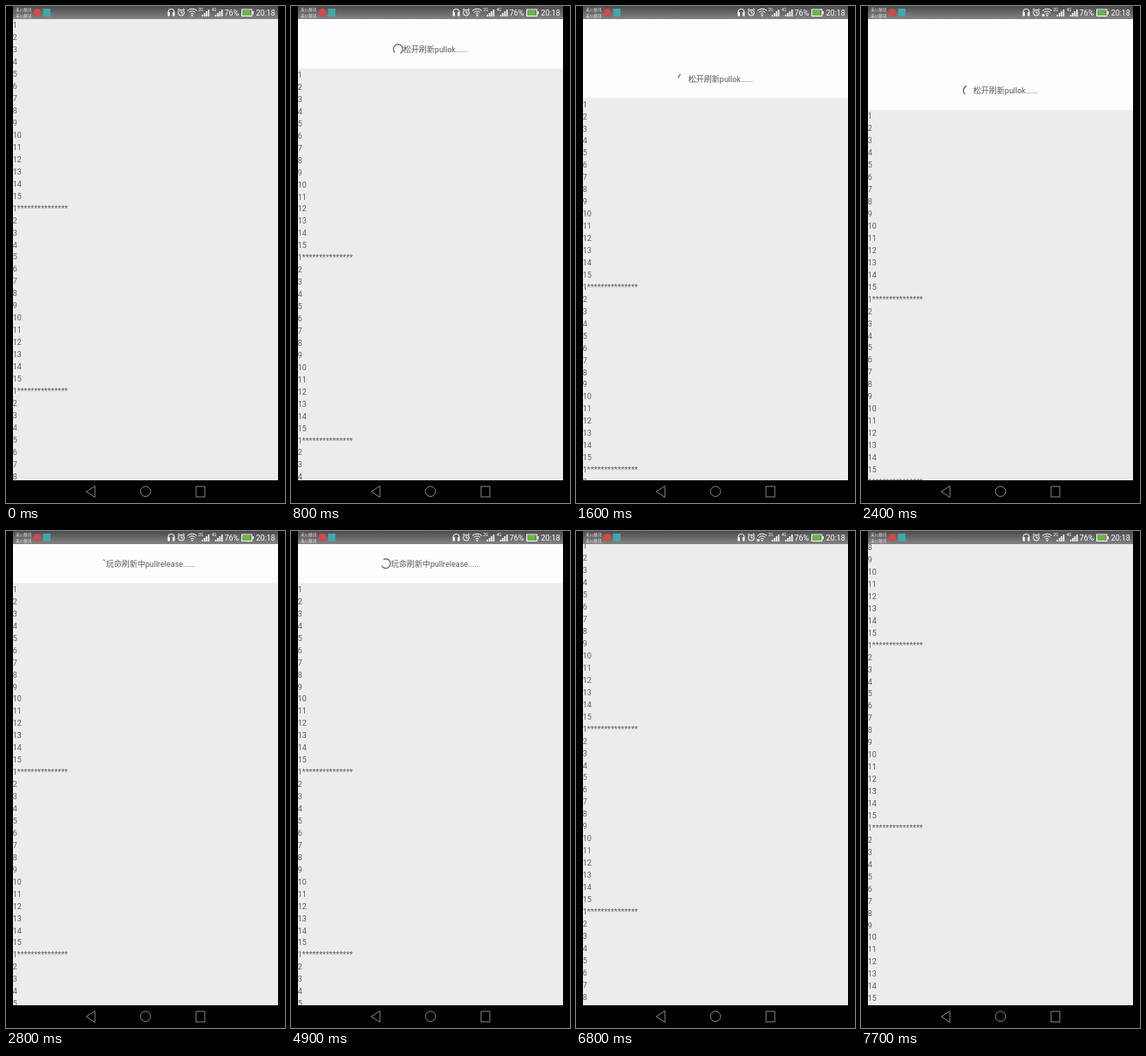
An HTML page with a canvas that plays this animation: 320 by 569 pixels, repeating every 8 s.

```html
<!DOCTYPE html>
<html lang="zh">
<head>
<meta charset="utf-8">
<title>Pull to refresh</title>
<style>
html, body { margin: 0; height: 100%; overflow: hidden; background: #000; }
canvas { display: block; width: 320px; height: 569px; }
</style>
</head>
<body>
<canvas id="stage" width="320" height="569"></canvas>
<script>
const ctx = document.getElementById('stage').getContext('2d');
const LOOP = 8000, STEP = 100;
const LEFT = 8, RIGHT = 312, TOP = 15, BOTTOM = 543;
const ROW = 13.95, HEADER = 44.5, GROUP = 15;

// [time, y of the first row's top edge]
const listTop = [
  [0, 15], [100, 15], [300, 28], [700, 66], [1200, 94], [1700, 108],
  [2400, 119], [2500, 119], [2800, 59.5], [5200, 59.5], [5500, 15],
  [6700, 15], [6800, 10], [6900, 10], [7000, -22], [7100, -52],
  [7200, -74], [7300, -86], [8000, -86]
];

function valueAt(keys, t) {
  const i = Math.max(1, keys.findIndex(k => k[0] >= t));
  const [t0, a] = keys[i - 1], [t1, b] = keys[i];
  return a + (b - a) * (t - t0) / (t1 - t0);
}

// cubic-bezier(.4, 0, .2, 1)
function fastOutSlowIn(x) {
  if (x <= 0) return 0;
  if (x >= 1) return 1;
  let lo = 0, hi = 1;
  for (let i = 0; i < 16; i++) {
    const s = (lo + hi) / 2, r = 1 - s;
    if (3 * r * r * s * .4 + 3 * r * s * s * .2 + s ** 3 < x) lo = s;
    else hi = s;
  }
  return 3 * lo * lo - 2 * lo ** 3;
}

function text(str, x, baseline, size, color) {
  ctx.font = `${size}px Roboto, "Noto Sans CJK SC", "Noto Sans CJK", sans-serif`;
  ctx.fillStyle = color;
  ctx.fillText(str, x, baseline);
}

function rect(x, y, w, h, color) {
  ctx.fillStyle = color;
  ctx.fillRect(x, y, w, h);
}

function arc(x, y, r, from = 0, to = 360) {
  ctx.beginPath();
  ctx.arc(x, y, r, from * Math.PI / 180, to * Math.PI / 180);
  ctx.stroke();
}

function line(...points) {
  ctx.beginPath();
  for (let i = 0; i < points.length; i += 2) ctx.lineTo(points[i], points[i + 1]);
  ctx.stroke();
}

// Indeterminate ring: the head runs ahead, then the tail catches up.
function spinner(x, y, t) {
  const cycle = (t - 2800) / 1333, n = Math.floor(cycle), u = cycle - n;
  const turn = -55 + 504 * n + 234 * u;
  const tail = 270 * fastOutSlowIn(2 * u - 1);
  const head = 270 * fastOutSlowIn(2 * u) + 18;
  ctx.strokeStyle = '#5c5b5d';
  ctx.lineWidth = 1.2;
  arc(x, y, 5.4, turn + tail, turn + head);
}

function header(top, t) {
  rect(LEFT, TOP, RIGHT - LEFT, top - TOP, '#fdfcfe');
  const label = t < 2700 ? '松开刷新pullok......' : '玩命刷新中pullrelease......';
  const y = top - HEADER / 2;
  ctx.font = '9px Roboto, "Noto Sans CJK SC", "Noto Sans CJK", sans-serif';
  const x = 160 - (12 + ctx.measureText(label).width) / 2;
  spinner(x + 6, y, t);
  text(label, x + 12, y + 3.7, 9, '#59585a');
}

function list(top, t) {
  ctx.save();
  ctx.beginPath();
  ctx.rect(LEFT, TOP, RIGHT - LEFT, BOTTOM - TOP);
  ctx.clip();
  rect(LEFT, TOP, RIGHT - LEFT, BOTTOM - TOP, '#ecebee');
  if (top > TOP) header(top, t);
  for (let i = 0; i < 48; i++) {
    const stars = i && i % GROUP === 0 ? '*'.repeat(15) : '';
    text(i % GROUP + 1 + stars, LEFT - .3, top + i * ROW + 10.4, 9, '#5e5d60');
  }
  ctx.restore();
}

function signal(x, label) {
  text(label, x - 4, 5.5, 4.5, '#fff');
  for (let i = 0; i < 4; i++) rect(x + i * 2.4, 10 - i * 2, 1.5, 2 + i * 2, '#fff');
}

function statusBar(t) {
  const shade = ctx.createLinearGradient(0, 0, 0, TOP);
  shade.addColorStop(0, '#4c4a4c');
  shade.addColorStop(1, '#858385');
  rect(LEFT, 0, RIGHT - LEFT, TOP, shade);

  text('禾川移讯', 11, 6, 4.6, '#e8e8e8');
  text('禾川移讯', 11, 13.2, 4.6, '#e8e8e8');
  ctx.fillStyle = '#cf4a48';
  ctx.beginPath();
  ctx.arc(36, 7.5, 4.5, 0, 7);
  ctx.fill();
  rect(42.5, 3, 8.5, 9, '#3fa9ad');

  ctx.strokeStyle = '#fff';
  ctx.lineWidth = 1;
  // headphones
  arc(189.5, 7, 3.6, 180, 360);
  rect(185.5, 7, 2.4, 4.5, '#fff');
  rect(191.1, 7, 2.4, 4.5, '#fff');
  // alarm clock
  arc(201, 7.7, 3.4);
  line(201, 5.5, 201, 8, 202.8, 8);
  line(197, 4.6, 199, 2.8);
  line(203, 2.8, 205, 4.6);
  // wifi
  for (const r of [2.6, 5.2, 7.8]) arc(213.5, 11, r, 225, 315);
  rect(212.7, 10, 1.7, 1.7, '#fff');
  if ((t >= 2000 && t < 2800) || (t >= 5700 && t < 7700)) rect(207.5, 9.3, 3, 2.4, '#fff');

  signal(224.5, '2G');
  signal(239.8, '4G');
  text('76%', 250.5, 11.3, 9, '#fff');
  // battery
  ctx.strokeRect(270.5, 4, 11.5, 7.5);
  rect(282.5, 6, 1.5, 3.5, '#fff');
  rect(271.3, 4.8, 9, 6, '#69b843');
  text('20:18', 286.8, 11.3, 8.8, '#fff');
}

function navBar() {
  rect(0, BOTTOM, 320, 26, '#000');
  ctx.strokeStyle = '#858585';
  ctx.lineWidth = 1;
  line(92, 556, 102, 549.5, 102, 562.5, 92, 556);
  arc(160, 555.7, 5.8);
  ctx.strokeRect(218, 550, 10, 12);
}

function draw(now) {
  const t = Math.floor(now % LOOP / STEP) * STEP;
  rect(0, 0, 320, 569, '#000');
  list(valueAt(listTop, t), t);
  statusBar(t);
  navBar();
  requestAnimationFrame(() => draw(performance.now()));
}
draw(0);
</script>
</body>
</html>
```
